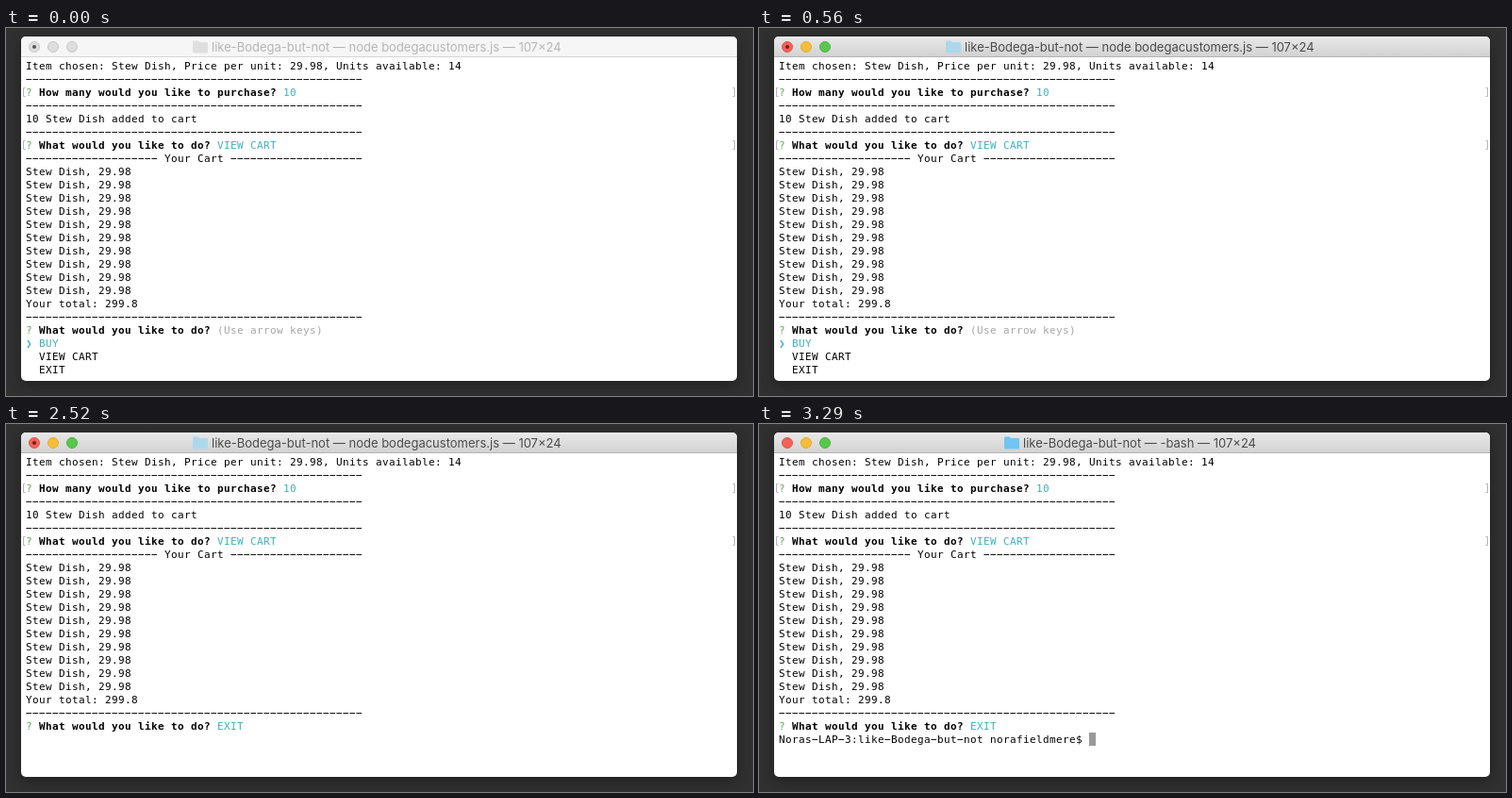
Animation of 792x390 px, one loop 4130 ms. Source, as an HTML page:

```html
<!DOCTYPE html>
<html lang="en">
<head>
<meta charset="utf-8">
<title>Terminal shop</title>
<style>
  html, body { margin: 0; width: 100%; height: 100%; overflow: hidden; background: #303030; }
  svg { display: block; width: 792px; height: 390px; }
  .term text { font: 11px "DejaVu Sans Mono", monospace; letter-spacing: .378px; white-space: pre; fill: #000; }
  .term .b { font-weight: bold; }
  .term .c { fill: #43b0bc; }
  .term .g { fill: #62a85c; }
  .term .h { fill: #a6a6a6; }
  #title { font: 13px Inter, sans-serif; white-space: pre; }
</style>
</head>
<body>
<svg viewBox="0 0 792 390">
  <defs>
    <linearGradient id="active" x2="0" y2="1">
      <stop stop-color="#e9e9e9"/><stop offset="1" stop-color="#d1d1d1"/>
    </linearGradient>
    <filter id="blur" x="-10%" y="-10%" width="120%" height="120%"><feGaussianBlur stdDeviation="7"/></filter>
  </defs>
  <rect width="792" height="390" fill="#303030"/>
  <rect x="16" y="13" width="759" height="365" rx="6" opacity=".35" filter="url(#blur)"/>
  <rect x="16" y="9" width="759" height="365" rx="5" fill="#fff"/>
  <path id="bar" d="M16 31V14a5 5 0 0 1 5-5H770a5 5 0 0 1 5 5V31z"/>
  <rect id="edge" x="16" y="30" width="759" height="1"/>
  <g id="lights"></g>
  <circle id="dot" cx="30" cy="20" r="2"/>
  <path id="folder" d="M0 2a1 1 0 0 1 1-1H5.500l1.500 1.500H15a1 1 0 0 1 1 1V13a1 1 0 0 1-1 1H1a1 1 0 0 1-1-1z"/>
  <text id="title" y="25"></text>
  <g class="term" id="fixed"></g>
  <g class="term" id="live"></g>
</svg>
<script>
const $ = id => document.getElementById(id);
const LOOP = 4130, FOCUS = 490, ANSWERED = 2520, PROMPT = 2590, CLOSED = 2730;
const PROJECT = "like-Bodega-but-not", ITEM = "Stew Dish";
const CHOICES = ["BUY", "VIEW CART", "EXIT"];
const STEPS = [0, FOCUS, 1400, 1960, ANSWERED, PROMPT, CLOSED];

// The terminal face has wide, high hyphens, so minus signs stand in for them.
const DASH = "\u2212";
const wide = s => s.replace(/-/g, DASH);
const dashes = n => DASH.repeat(n);
const span = (cls, s) => `<tspan class="${cls}">${s}</tspan>`;
const row = (n, s, x = 21) => `<text x="${x}" y="${44 + 14 * n}">${s}</text>`;
const ask = (question, answer) => span("g", "?") + span("b", ` ${question} `) + answer;
const WHAT = "What would you like to do?";

const lines = [
  `Item chosen: ${ITEM}, Price per unit: 29.98, Units available: 14`,
  dashes(51),
  ask("How many would you like to purchase?", span("c", "10")),
  dashes(51),
  `10 ${ITEM} added to cart`,
  dashes(51),
  ask(WHAT, span("c", "VIEW CART")),
  `${dashes(20)} Your Cart ${dashes(20)}`,
  ...Array(10).fill(`${ITEM}, 29.98`),
  "Your total: 299.8",
  dashes(51)
];
const bracket = (x, dir, n) => {
  const y = 35.5 + 14 * n;
  return `<path d="M${x + 2 * dir} ${y}H${x}V${y + 9}H${x + 2 * dir}" fill="none" stroke="#b4b4b4"/>`;
};
$("fixed").innerHTML = lines.map((s, n) => row(n, s)).join("") +
  [2, 6].map(n => bracket(18.5, 1, n) + bracket(772.5, -1, n)).join("");

function drawBar(t) {
  const on = t >= FOCUS, closed = t >= CLOSED;
  const paint = (id, color) => $(id).setAttribute("fill", color);
  const left = closed ? 280 : 218;
  const colors = on
    ? [["#f0625a", "#e2564d"], ["#f6bd3b", "#e5ab30"], ["#57c84d", "#4ab541"]]
    : Array(3).fill(["#dedede", "#c8c8c8"]);
  paint("bar", on ? "url(#active)" : "#f6f6f6");
  paint("edge", on ? "#b3b3b3" : "#d6d6d6");
  paint("dot", closed ? "none" : on ? "#7d1a14" : "#555");
  paint("folder", closed ? "#70c5f2" : on ? "#acd8ec" : "#dfdfdf");
  paint("title", on ? "#4b4b4b" : "#b5b5b5");
  $("lights").innerHTML = colors.map(([fill, stroke], i) =>
    `<circle cx="${30 + 20 * i}" cy="20" r="5.500" fill="${fill}" stroke="${stroke}"/>`).join("");
  $("folder").setAttribute("transform", `translate(${left - 20} 12.500)`);
  $("title").setAttribute("x", left);
  $("title").textContent = `${PROJECT} — ${closed ? "-bash" : "node bodegacustomers.js"} — 107×24`;
}

function drawMenu(t) {
  const picked = t < 1400 ? 0 : t < 1960 ? 1 : 2;
  const done = t >= ANSWERED;
  const note = done ? span("c", "EXIT") : picked ? "" : span("h", "(Use arrow keys)");
  let out = row(20, ask(WHAT, note));
  if (!done) {
    out += CHOICES.map((s, i) => i === picked
      ? row(21 + i, span("c", "❯")) + row(21 + i, span("c", s), 35)
      : row(21 + i, s, 35)).join("");
  } else if (t >= PROMPT) {
    out += row(21, wide(`Noras-LAP-3:${PROJECT} norafieldmere$`)) +
      `<rect x="350" y="327" width="7" height="14" fill="#9a9a9a"/>`;
  }
  $("live").innerHTML = out;
}

let shown = -1;
const start = performance.now();
function tick() {
  const t = (performance.now() - start) % LOOP;
  const step = STEPS.filter(s => s <= t).length;
  if (step !== shown) {
    shown = step;
    drawBar(t);
    drawMenu(t);
  }
  requestAnimationFrame(tick);
}
tick();
</script>
</body>
</html>
```
